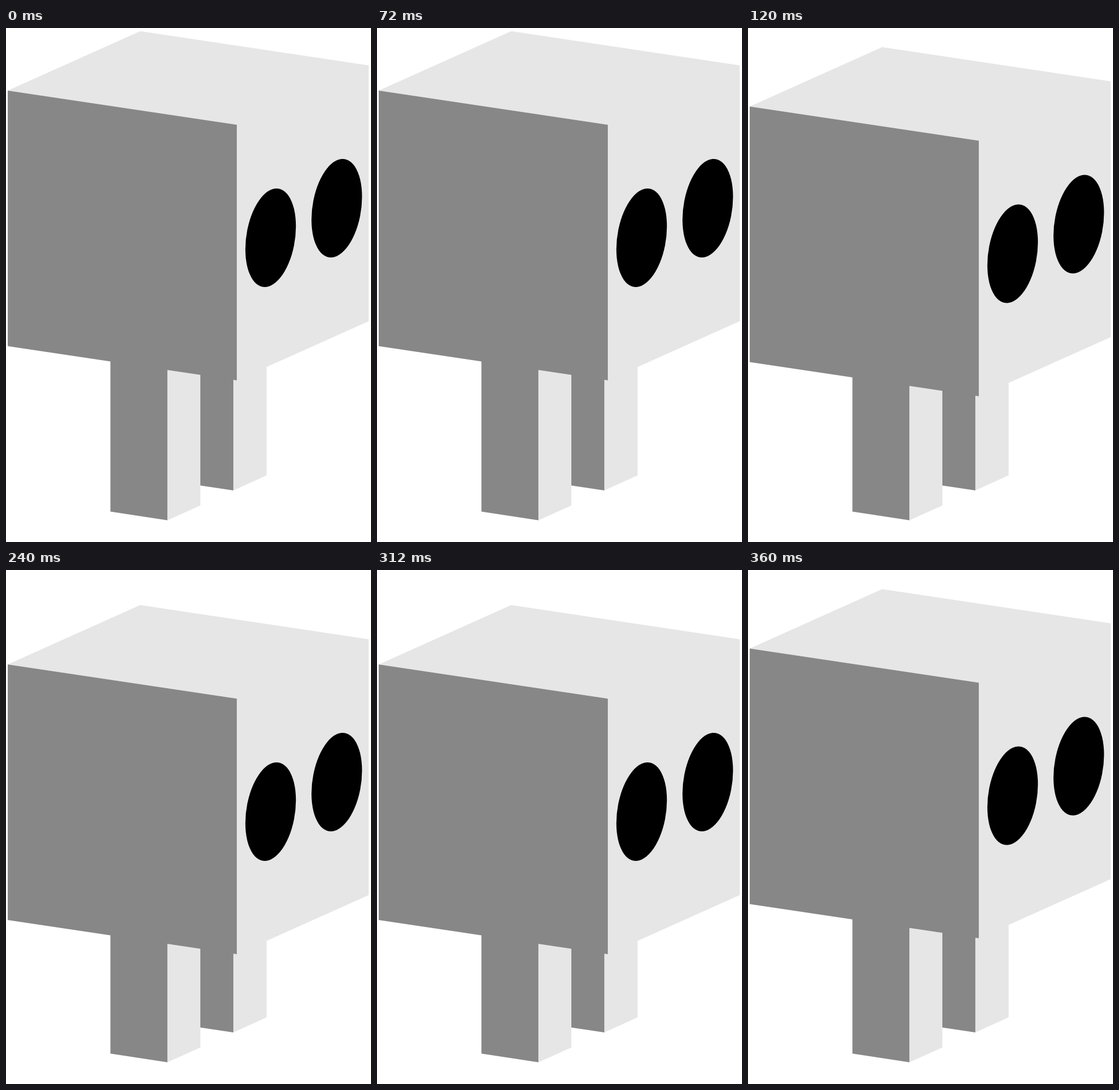
An HTML page with a canvas for the animation above (0.48 s loop, 631 by 887 pixels).

```html
<!DOCTYPE html>
<html lang="en">
<head>
<meta charset="utf-8">
<title>Bobbing cube</title>
<style>
html, body { margin: 0; width: 100%; height: 100%; overflow: hidden; background: #fff; }
canvas { display: block; }
</style>
</head>
<body>
<canvas id="stage" width="631" height="887"></canvas>
<script>
const ctx = document.getElementById('stage').getContext('2d');
const LIGHT = '#e6e6e6', DARK = '#878787';
const STEP = 120, DIP = 27.5;
const SLOPE = -0.4518; // rise of the right-hand face
const LEG_TOP = 570;

function poly(color, ...points) {
  ctx.fillStyle = color;
  ctx.beginPath();
  for (const [x, y] of points) ctx.lineTo(x, y);
  ctx.fill();
}

// The light side runs under the dark one so no seam shows.
function leg(left, edge, right, leftY, edgeY, rightY) {
  poly(LIGHT, [edge - 1, LEG_TOP], [right, LEG_TOP], [right, rightY], [edge, edgeY], [edge - 1, edgeY]);
  poly(DARK, [left, LEG_TOP], [edge, LEG_TOP], [edge, edgeY], [left, leftY]);
}

// A circle sheared onto the right-hand face.
function eye(x, y) {
  ctx.save();
  ctx.transform(1, SLOPE, 0, 1, x, y);
  ctx.fillStyle = '#000';
  ctx.beginPath();
  ctx.ellipse(0, 0, 43.7, 82.7, 0, 0, Math.PI * 2);
  ctx.fill();
  ctx.restore();
}

function body(dy) {
  ctx.save();
  ctx.translate(0, dy);
  poly(LIGHT, [3, 108], [232, 5.5], [627, 64.5], [627, 506], [399, 608], [398, 607], [398, 167]);
  poly(DARK, [3, 108], [399, 167], [399, 608], [3, 549]);
  eye(457.5, 362);
  eye(571.8, 311);
  ctx.restore();
}

function draw(time) {
  const step = Math.floor(time / STEP) % 4;
  ctx.fillStyle = '#fff';
  ctx.fillRect(0, 0, 631, 887);
  leg(336, 393, 450.5, 789.5, 798, 772);
  leg(180.5, 279, 336, 834.5, 849.5, 824);
  body(DIP * (2 - Math.abs(step - 2)));
}

const start = performance.now();
function tick() {
  draw(performance.now() - start);
  requestAnimationFrame(tick);
}
tick();
</script>
</body>
</html>
```
